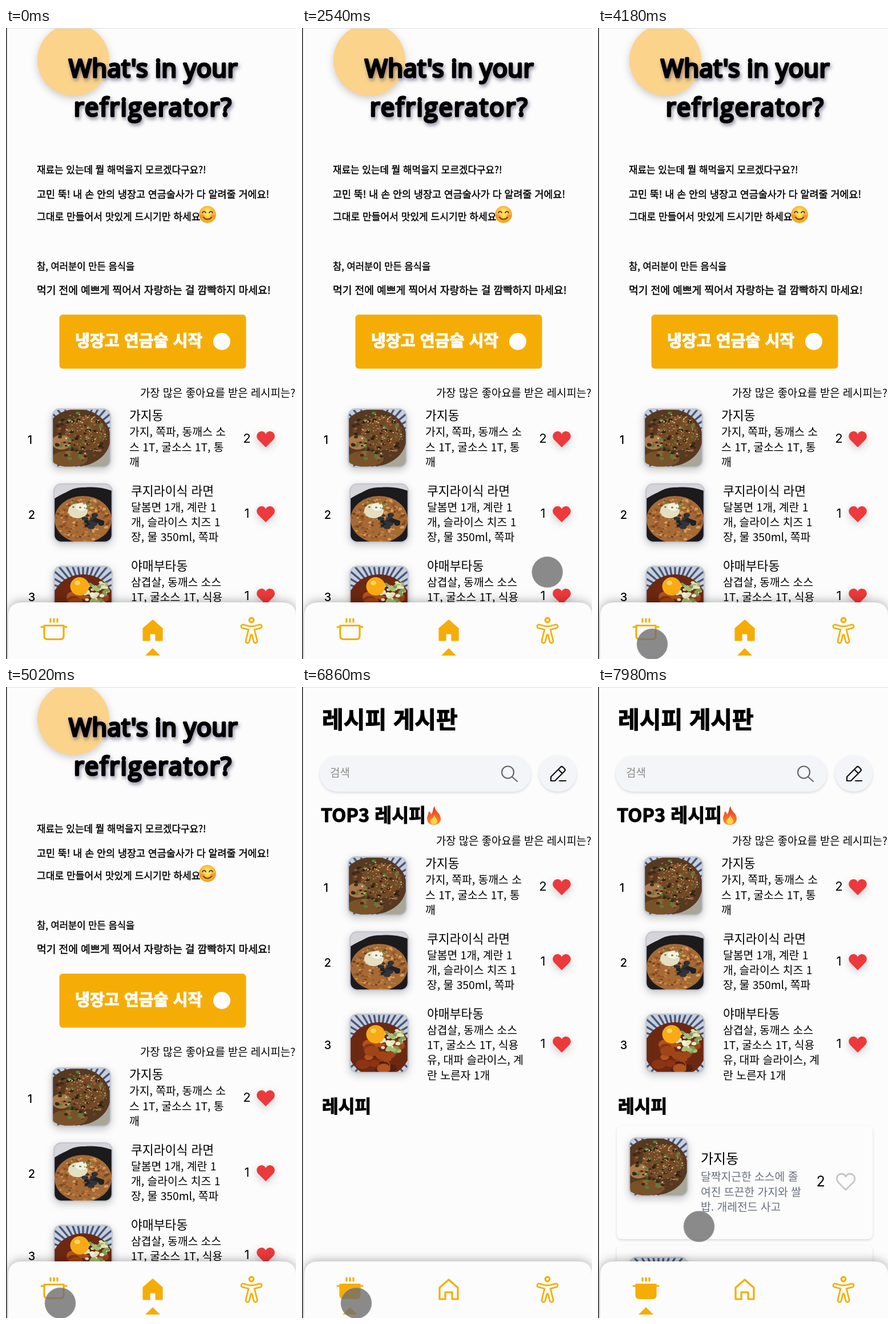
An HTML page that plays this animation: 508 by 1103 pixels, repeating every 8 s.

```html
<!DOCTYPE html>
<html lang="ko">
<head>
<meta charset="utf-8">
<style>
  html, body { margin: 0; width: 100%; height: 100%; overflow: hidden; background: #fcfcfc; }
  svg { display: block; width: 100vw; height: 100vh; font-family: "Noto Sans CJK KR", "Noto Sans KR", "Noto Sans CJK", sans-serif; }
  .title { font: 43px "Open Sans", "Noto Sans", sans-serif; stroke: #000; stroke-width: 3.7; stroke-linejoin: round;
    text-anchor: middle; filter: drop-shadow(2px 4px 3px #4a456899); }
  .black { font-weight: 900; stroke-width: 1.1; }
  .hand { stroke: #000; stroke-width: .45; }
  .num { font-family: Inter, sans-serif; text-anchor: middle; }
  .drop { filter: drop-shadow(0 4px 7px #0003); }
  .soft { filter: drop-shadow(0 2px 2px #0002); }
  .line { fill: none; stroke: #f5ad05; stroke-width: 3.2; stroke-linecap: round; stroke-linejoin: round; }
</style>
</head>
<body>
<script>
const AMBER = '#f5ad05', PAPER = '#fcfcfc';

let seed = 7;
const rnd = () => (seed = seed * 16807 % 2147483647) / 2147483647;

// text placed by its left edge (or middle) and optical centre
const text = (x, cy, size, str, attrs = '') =>
  `<text x="${x}" y="${cy + .38 * size}" font-size="${size}" ${attrs}>${str}</text>`;
const lines = (x, cy, size, rows, attrs) =>
  rows.map((row, i) => text(x, cy + i * 26.3, size, row, attrs)).join('');
const ellipse = (x, y, rx, ry, fill) => `<ellipse cx="${x}" cy="${y}" rx="${rx}" ry="${ry}" fill="${fill}"/>`;
const rect = (x, y, w, h, r, attrs) => `<rect x="${x}" y="${y}" width="${w}" height="${h}" rx="${r}" ${attrs}/>`;
const path = (d, attrs = '') => `<path d="${d}" ${attrs}/>`;

// scattered specks inside an ellipse
function specks(n, cx, cy, rx, ry, size, colors) {
  let out = '';
  for (let i = 0; i < n; i++) {
    const a = rnd() * 6.283, d = Math.sqrt(rnd()), s = size * (.6 + rnd() * .7);
    out += ellipse((cx + rx * d * Math.cos(a)).toFixed(1), (cy + ry * d * Math.sin(a)).toFixed(1),
      s.toFixed(1), (s * .7).toFixed(1), colors[i % colors.length]);
  }
  return out;
}

// rim of a striped bowl
function bowl() {
  let out = rect(0, 0, 102, 102, 0, 'fill="#c9ced8"');
  for (let i = 0; i < 36; i++)
    out += `<path d="M51 51V-30" stroke="#43577f" stroke-width="3.4" transform="rotate(${i * 10} 51 51)"/>`;
  return out;
}

const photos = [
  bowl() + path('M50 102L102 60V102Z', 'fill="#aaa697"') +
    ellipse(44, 50, 58, 50, '#573921') + ellipse(58, 42, 36, 30, '#744a26') +
    ellipse(16, 58, 17, 13, '#a97a4b') + ellipse(30, 87, 32, 14, '#7a5229') +
    specks(110, 48, 48, 46, 42, 3, ['#54803a', '#2c2112', '#96643a', '#6f4521', '#3d2a17']) +
    specks(120, 58, 44, 38, 36, 1.2, ['#e0c898', '#b98c58']),
  rect(0, 0, 102, 102, 0, 'fill="#1b1a1d"') + path('M0 0H102V12Q50 -6 0 26Z', 'fill="#d5d4d8"') +
    ellipse(51, 60, 54, 54, '#1b1a1d') + ellipse(51, 62, 50, 41, '#a56a35') +
    specks(200, 51, 62, 47, 38, 2.6, ['#d89d5c', '#7d451f', '#bd7d3e', '#93582a']) +
    ellipse(42, 47, 17, 13, '#e3dfc3') + ellipse(48, 40, 10, 7, '#f5f2e4') +
    specks(26, 67, 64, 19, 12, 4.5, ['#1f2227', '#30343a']) + specks(10, 44, 38, 20, 9, 1.7, ['#5b8a45']),
  bowl() + ellipse(51, 62, 54, 48, '#6d2811') +
    specks(24, 50, 68, 44, 36, 11, ['#8d3413', '#b3531d', '#54200f', '#a04518']) +
    specks(50, 75, 46, 22, 21, 4, ['#dfe5b8', '#a9bd74', '#f0f0d8', '#7f9c55']) +
    ellipse(45, 35, 16.5, 16, '#f8ab15') + ellipse(41, 29, 5, 4, '#ffd765')
];

const photo = (i, x, y) => `<g class="drop">${rect(x, y, 102, 102, 13, 'fill="#c5cad6"')}
  <svg x="${x}" y="${y}" width="102" height="102"><g clip-path="url(#round)">${photos[i]}</g></svg>
  ${rect(x, y, 102, 102, 13, 'fill="none" stroke="#c3c8d4" stroke-width="2.4"')}</g>`;

const heart = (x, y, attrs) => path('M0 14L-13 1C-18 -4 -16 -13 -8 -14C-4 -14 -1 -12 0 -9C1 -12 4 -14 8 -14C16 -13 18 -4 13 1Z',
  `transform="translate(${x} ${y})" stroke-linejoin="round" ${attrs}`);

// one ranking row: y is the centre of the picture
const row = (i, x, y, likes, titleY, name, parts) =>
  text(x - 39, y + 2, 20, i + 1, 'class="num" font-weight="500"') + photo(i, x, y - 51) +
  text(x + 135, titleY, 21.6, name) + lines(x + 135, titleY + 29, 19.3, parts) +
  text(422, y, 22, likes, 'class="num"') + heart(455, y + 2, 'fill="#ec393b" class="drop"');

const ranking = text(235, 269, 18.8, '가장 많은 좋아요를 받은 레시피는?') +
  row(0, 81, 348, 2, 308, '가지동', ['가지, 쪽파, 동깨스 소', '스 1T, 굴소스 1T, 통', '깨']) +
  row(1, 84, 479, 1, 439.5, '쿠지라이식 라면', ['달봄면 1개, 계란 1', '개, 슬라이스 치즈 1', '장, 물 350ml, 쪽파']) +
  row(2, 84, 623, 1, 570.5, '야매부타동', ['삼겹살, 동깨스 소스', '1T, 굴소스 1T, 식용', '유, 대파 슬라이스, 계', '란 노른자 1개']);

const smile = `<g transform="translate(353 326)">${ellipse(0, 0, 15, 15, 'url(#face)')}
  ${ellipse(-9, 3, 4, 3, '#f5793f99')}${ellipse(9, 3, 4, 3, '#f5793f99')}
  ${path('M-9 -3Q-6 -8 -3 -3M3 -3Q6 -8 9 -3M-7 5Q0 12 7 5', 'fill="none" stroke="#6b3a12" stroke-width="2" stroke-linecap="round"')}</g>`;

const flame = path('M232 208C232 217 243 220 243 230C243 237 238 241 231 241C224 241 219 237 219 230C219 225 222 222 222 217C225 219 226 221 226 223C230 219 229 212 232 208Z', 'fill="url(#fire)"') +
  path('M232 223C232 229 238 230 237 235C236 239 234 240 231 240C227 240 225 238 225 234C225 231 231 229 232 223Z', 'fill="#ffd54a"');

const home = ellipse(118, 56, 63, 63, '#fbd38a" class="drop') +
  '<text class="title" x="258" y="86" letter-spacing=".7">What\'s in your</text>' +
  '<text class="title" x="258" y="154" letter-spacing="2.2">refrigerator?</text>' +
  [[248, 16.9, '재료는 있는데 뭘 해먹을지 모르겠다구요?!'],
   [290, 17.4, '고민 뚝! 내 손 안의 냉장고 연금술사가 다 알려줄 거에요!'],
   [330, 17.1, '그대로 만들어서 맛있게 드시기만 하세요'],
   [417, 16.6, '참, 여러분이 만든 음식을'],
   [458, 18.2, '먹기 전에 예쁘게 찍어서 자랑하는 걸 깜빡하지 마세요!']]
    .map(([y, size, str]) => text(54, y, size, str, 'class="hand"')).join('') + smile +
  rect(93.5, 501, 327, 94.5, 6, `fill="${AMBER}"`) +
  text(121, 546, 28.2, '냉장고 연금술 시작', 'class="black" fill="#fff" stroke="#fff"') +
  ellipse(378, 548, 15, 15, '#fff') +
  `<g transform="translate(0 369)">${ranking}</g>`;

const card = (y, inner) => rect(33, y, 448, 198, 8, `fill="${PAPER}" class="soft"`) + inner;

const list = card(767, photo(0, 55, 788) + text(180, 824, 24, '가지동') +
    lines(180, 856, 19.3, ['달짝지근한 소스에 졸', '여진 뜨끈한 가지와 쌀', '밥. 개레전드 사고'], 'fill="#69707d"') +
    text(390, 863, 25, 2, 'class="num"') + heart(434, 865, 'fill="none" stroke="#c6c6c6" stroke-width="2.8"')) +
  card(976, photo(2, 55, 997));

const board = text(35, 56, 41, '레시피 게시판', 'class="black" stroke="#000"') +
  rect(31, 120, 370, 63, 31.5, 'fill="#f4f5f9" class="soft"') + text(49, 150, 19, '검색', 'fill="#8b8b8b"') +
  path('M371 149A10.5 10.5 0 1 1 350 149A10.5 10.5 0 1 1 371 149M368 157L377 165', 'fill="none" stroke="#666" stroke-width="2.2" stroke-linecap="round"') +
  ellipse(448, 151, 33, 32, '#f4f5f9" class="soft') +
  path('M436 164V157L453 140Q455 138 457 140L460 143Q462 145 460 147L443 164ZM449 144L456 151M451 164H462', 'fill="none" stroke="#111" stroke-width="2.2" stroke-linejoin="round" stroke-linecap="round"') +
  text(33, 224, 32.5, 'TOP3 레시피', 'class="black" stroke="#000"') + flame + ranking +
  text(35, 732, 31.2, '레시피', 'class="black" stroke="#000"') + `<g id="list">${list}</g>`;

const limbs = 'M415 1046L427 1049H433L445 1046M430 1050V1058M428 1052L423 1072M432 1052L437 1072';
const nav = path('M4 1110V1028Q4 1004 30 1004H482Q508 1004 508 1028V1110Z', `fill="${PAPER}" style="filter:drop-shadow(0 -3px 8px #0004)"`) +
  `<g class="line">${path('M78 1033V1038M84 1033V1038M90 1033V1038M62 1047H67M101 1047H106')}
    ${path('M67 1044.5H101V1063Q101 1068.5 95 1068.5H73Q67 1068.5 67 1063Z', 'id="pot"')}
    ${path('M241 1050L257 1036L273 1050V1070H263V1058H251V1070H241Z', 'id="house"')}
    <circle cx="430" cy="1035" r="3.8"/>${path(limbs, 'stroke-width="9"')}</g>
  ${path(limbs, `fill="none" stroke="${PAPER}" stroke-width="3.6" stroke-linecap="round" stroke-linejoin="round"`)}` +
  path('M-13 1097L0 1084L13 1097Z', `id="mark" fill="${AMBER}"`);

document.body.innerHTML = `<svg viewBox="0 0 508 1103">
  <defs>
    <clipPath id="round"><rect width="102" height="102" rx="13"/></clipPath>
    <radialGradient id="face" cy=".4"><stop offset=".3" stop-color="#ffe063"/><stop offset="1" stop-color="#f4a624"/></radialGradient>
    <linearGradient id="fire" x2="0" y2="1"><stop stop-color="#e5352b"/><stop offset="1" stop-color="#ff8d23"/></linearGradient>
  </defs>
  <rect width="508" height="1103" fill="${PAPER}"/>
  <g id="home">${home}</g><g id="board">${board}</g>${nav}
  <rect width="508" height="1" fill="#dedede"/><rect width="1.5" height="1103" fill="#222"/>
  <circle id="pointer" r="27" fill="#6e6e6e" fill-opacity=".8" stroke="#aaa" stroke-opacity=".6"/>
</svg>`;

const LOOP = 8000, SWITCH = 6760, LOADED = 7400;
// time, x, y of the pointer
const track = [[2280, 540, 845], [2400, 484, 898], [2540, 430, 951], [3520, 188, 1060],
  [4000, 95, 1077], [7480, 95, 1077], [7980, 177, 943], [8000, 177, 943]];

function pointerAt(t) {
  const i = track.findIndex(k => t < k[0]);
  if (i < 1) return [-60, -60];
  const [t0, x0, y0] = track[i - 1], [t1, x1, y1] = track[i], f = (t - t0) / (t1 - t0);
  return [x0 + (x1 - x0) * f, y0 + (y1 - y0) * f];
}

const $ = id => document.getElementById(id);
const show = (id, on) => $(id).style.display = on ? '' : 'none';

function draw(now) {
  const t = now % LOOP, onBoard = t >= SWITCH;
  show('home', !onBoard);
  show('board', onBoard);
  show('list', t >= LOADED);
  $('pot').setAttribute('fill', onBoard ? AMBER : 'none');
  $('house').setAttribute('fill', onBoard ? 'none' : AMBER);
  $('mark').setAttribute('transform', `translate(${onBoard ? 84 : 257})`);
  $('pointer').setAttribute('transform', `translate(${pointerAt(t)})`);
  requestAnimationFrame(draw);
}
draw(performance.now());
</script>
</body>
</html>
```
